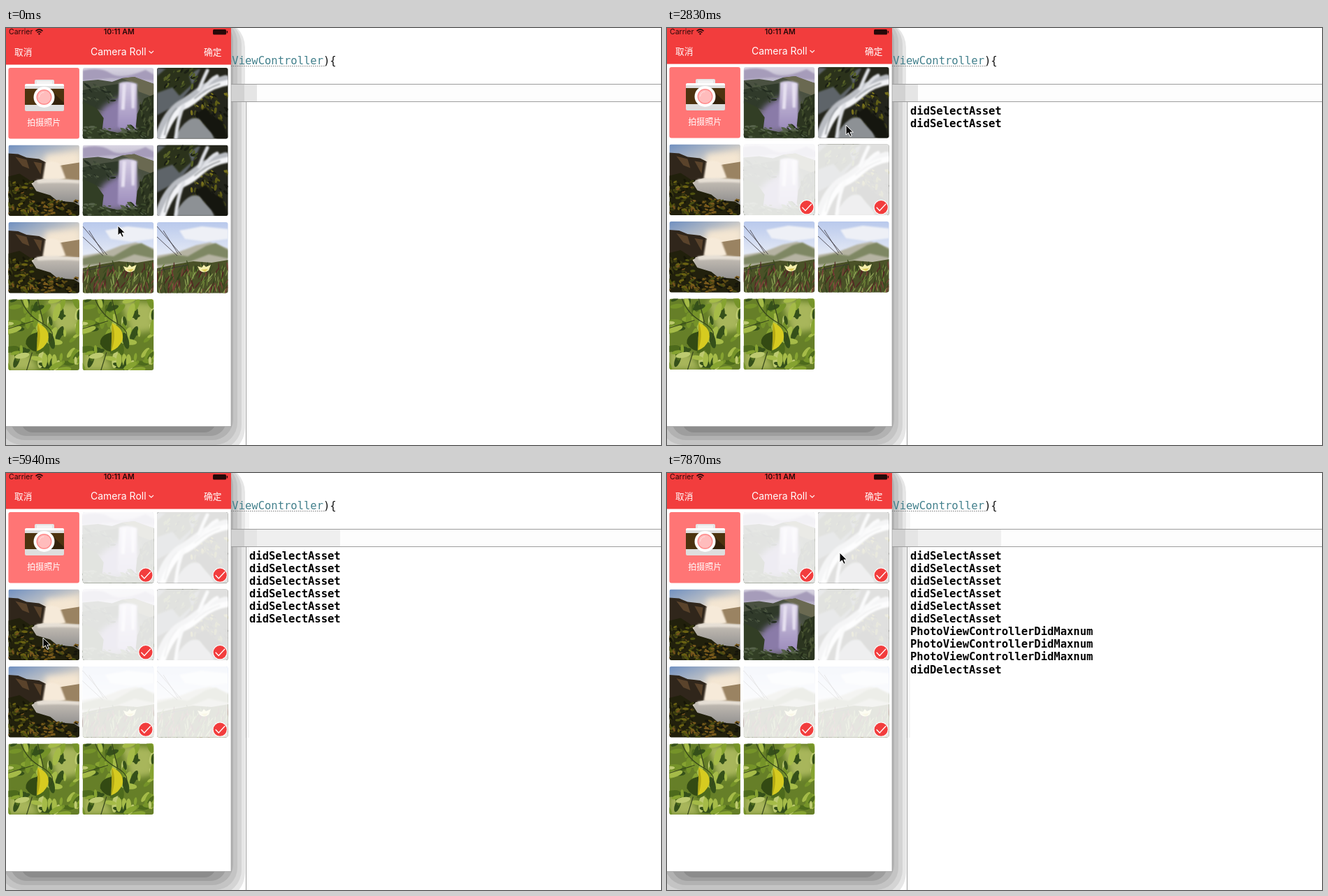
An HTML page that plays this animation: 937 px wide and 597 px high, repeating every 8000 ms.

```html
<!DOCTYPE html>
<html lang="zh">
<head>
<meta charset="utf-8">
<title>Photo picker</title>
<style>
html, body { margin: 0; width: 100%; height: 100%; overflow: hidden; background: #fff; }
svg { display: block; width: 937px; height: 597px; }
.ui { font-family: Inter, "Noto Sans CJK SC", "Noto Sans CJK", sans-serif; }
.mono { font: 15.5px "DejaVu Sans Mono", monospace; white-space: pre; }
#log { font-weight: bold; }
.soft { filter: blur(1.2px); }
.haze { filter: blur(4px); }
</style>
</head>
<body>
<svg viewBox="0 0 937 597">
<defs>
  <clipPath id="round"><rect width="101.5" height="101.5" rx="3"/></clipPath>
  <linearGradient id="dusk" x2="0" y2="1"><stop stop-color="#d9d5e2"/><stop offset="1" stop-color="#aaa3bd"/></linearGradient>
  <linearGradient id="fall" x2="0" y2="1"><stop stop-color="#d4cce3"/><stop offset="1" stop-color="#9b8bbb"/></linearGradient>
  <linearGradient id="morning" x2=".7" y2="1"><stop stop-color="#6f8fc0"/><stop offset=".55" stop-color="#d5d0c8"/><stop offset="1" stop-color="#f0dfc0"/></linearGradient>
  <linearGradient id="lake" x2="0" y2="1"><stop stop-color="#d0c8bd"/><stop offset="1" stop-color="#74767a"/></linearGradient>
  <linearGradient id="pale" x2="0" y2="1"><stop stop-color="#b9c9ec"/><stop offset="1" stop-color="#f1f3f8"/></linearGradient>

  <g id="gorge">
    <path fill="url(#dusk)" d="M0 0h102v30H0z"/>
    <path class="soft" fill="#a69cba" d="M0 4Q25-2 40 8T90 3L102 10V18L40 15L0 18z"/>
    <path fill="#4a5141" d="M0 19L22 17L42 20L56 15L74 13L88 19L102 23V102H0z"/>
    <path fill="#6a6951" d="M56 15L74 13L102 23V42L80 34L78 23z"/>
    <path fill="#303a2a" d="M0 32L30 26L52 23V60L30 62L0 52z"/>
    <path class="haze" fill="#8a7ba8" d="M30 56L52 42H76L82 90L30 94L18 76z"/>
    <path class="soft" fill="url(#fall)" d="M52 22Q64 17 78 23L77 88Q62 94 50 84z"/>
    <path class="soft" fill="#e6e0f0" d="M57 23h5L60 60h-5zM69 23h6L74 58h-4z"/>
    <path fill="#2c3520" d="M102 38L88 44L78 66L76 84L88 102H102z"/>
    <path fill="#323e25" d="M0 48L20 58L30 72L28 88L50 93L78 88L96 102H0z"/>
    <g id="gorgeMoss"></g>
  </g>

  <g id="stream">
    <path fill="#24251c" d="M0 0h102v102H0z"/>
    <path class="soft" fill="#5e6469" d="M0 0L30 4L62 2L48 30L30 52L0 68z"/>
    <path class="soft" fill="#2b321b" d="M14 0H60L46 12L50 24L32 40L22 28L0 36V12z"/>
    <g id="streamMoss"></g>
    <path class="soft" fill="#8d9195" d="M24 102Q44 64 62 74L78 92L82 102z"/>
    <g class="soft" fill="none" stroke-linecap="round">
      <path stroke="#b9bcc2" stroke-width="13" d="M98 17Q74 24 60 35T34 53Q14 66 4 98"/>
      <path stroke="#f3f4f7" stroke-width="8" d="M102 21Q78 25 64 38T38 56Q20 68 8 102"/>
      <path stroke="#dfe1e6" stroke-width="5" d="M38 54Q30 72 27 100M72 4Q66 16 60 31M86 12Q76 16 66 32"/>
      <path stroke="#85898d" stroke-width="1.5" d="M28 58Q16 70 11 96M90 23Q70 30 54 44"/>
    </g>
    <path class="soft" fill="#15160f" d="M70 56L80 70L94 76L102 102H86L68 82L56 66z"/>
  </g>

  <g id="cove">
    <path fill="url(#morning)" d="M0 0h102v60H0z"/>
    <path class="haze" fill="#f4e6d2" d="M54 14L102 10V48H48z"/>
    <path fill="url(#lake)" d="M36 48L102 44V102H30z"/>
    <path fill="#9a8362" d="M70 30L102 25V50L72 50z"/>
    <path fill="#30261b" d="M0 12L14 13L26 18L44 20L54 25L52 48L34 52L0 60z"/>
    <path fill="#5a432b" d="M10 17L26 21L30 34L20 30zM36 24L48 26L46 42z"/>
    <path class="soft" fill="#f6ead9" d="M53 25Q64 21 74 27L82 48Q66 54 49 49z"/>
    <path class="soft" fill="#e6dfd5" d="M40 50Q70 46 102 51V55Q70 53 42 55z"/>
    <path fill="#21200c" d="M0 45L16 41L30 50L40 66L60 72L70 80L94 82L102 87V102H0z"/>
    <g id="coveMoss"></g>
  </g>

  <g id="meadow">
    <path fill="url(#pale)" d="M0 0h102v60H0z"/>
    <path class="soft" fill="#eef0f6" d="M32 12L64 6L102 10V24L70 28L40 24z"/>
    <path class="soft" fill="#b5b3a2" d="M0 48L30 43L56 33L76 29L102 38V72H0z"/>
    <path class="soft" fill="#7e8763" d="M0 52L24 46L44 49L70 34L84 30L102 40V52L74 46L46 57L0 62z"/>
    <path fill="#4a5127" d="M0 66L28 60L52 56L78 58L102 54V102H0z"/>
    <g id="meadowGrass"></g>
    <path fill="none" stroke="#39343a" stroke-width=".8" d="M0 6L35 47M0 21L29 48M9 12L30 45M0 70L44 61"/>
    <path fill="#f4efac" d="M58 63L64 65L67 61L70 64L77 61L74 69Q67 74 61 69z"/>
    <path fill="#dccc55" d="M63 68L73 67L69 71z"/>
  </g>

  <g id="leaves">
    <path fill="#667f28" d="M0 0h102v102H0z"/>
    <path class="haze" fill="#a8b65b" d="M54 2L102 6V44L70 50zM0 72L32 80L44 102H0z"/>
    <g id="leafMass"></g>
    <path fill="none" stroke="#35451b" stroke-width="1.2" d="M18 0Q26 22 48 34T60 60M42 0L50 34M0 42L36 31M34 76L26 102"/>
    <path fill="#334a13" d="M42 47Q24 51 25 64Q31 74 40 75z"/>
    <path fill="#d6cb20" d="M42 34Q60 42 57 58Q52 70 41 74z"/>
    <path fill="#b4a914" d="M42 34Q49 52 41 74z"/>
  </g>

  <g id="badge">
    <circle r="10.6" fill="#fff"/><circle r="9.6" fill="#f23d3d"/>
    <path fill="none" stroke="#fff" stroke-width="1.3" d="M-6.5 0L-2 4.8L7-5"/>
  </g>
</defs>

<rect width="937" height="597" fill="#fff"/>
<path fill="#fdfdfd" d="M322 81h615v24H322z"/>
<g id="shadow"></g>
<path id="ghost" fill="#f6f6f6"/>
<path id="strip" fill="#efefef" d="M359 81h119v24H359z"/>
<path fill="#e5e5e5" d="M341 81h18v24h-18z"/>
<path fill="#d2d2d2" d="M322 81h19v24h-19z"/>
<path fill="none" stroke="#9c9c9c" d="M322 80.5h615M322 105.5h615M343.5 106V597"/>
<text class="mono" x="276.7" y="51.5" fill="#43808c">PhotoViewController<tspan fill="#111">){</tspan></text>
<path stroke="#777" stroke-dasharray="1.5 1.5" d="M322 54.5h134"/>
<g id="log" class="mono"></g>

<rect x="-5" y="-5" width="327" height="575.5" fill="#fff"/>
<path fill="none" stroke="#8f8f8f" d="M0 570.5H322V52" stroke-opacity=".6"/>
<rect id="bar" width="322" height="51.5" fill="#f23d3d"/>
<g class="ui" fill="#260909">
  <text x="4" y="9.3" font-size="10.5">Carrier</text>
  <text x="161.7" y="9.3" font-size="10.6" font-weight="600" text-anchor="middle">10:11 AM</text>
  <g fill="none" stroke="#260909" stroke-width="1.6"><path d="M42.5 4.3Q47.5 0 52.5 4.3M44.5 6.5Q47.5 4 50.5 6.5"/></g>
  <circle cx="47.5" cy="8.4" r="1.2"/>
  <rect x="296" y="2" width="19" height="7.5" rx="1.5"/><rect x="315.7" y="4" width="1.4" height="3.4"/>
</g>
<g id="content">
  <g class="ui" fill="#fff">
    <text x="12" y="37.6" font-size="12.7">取消</text>
    <text x="121" y="38" font-size="14">Camera Roll</text>
    <text x="283" y="37.6" font-size="12.7">确定</text>
    <path fill="none" stroke="#fff" stroke-width="1.1" d="M204.5 31.8L207.8 35L211 31.8"/>
    <rect x="3.4" y="56" width="101.5" height="101.5" rx="3" fill="#ff7575"/>
    <path fill="#e5e5e5" d="M41 79V75Q41 73 43 73H67Q69 73 69 75V79z"/>
    <path fill="#f3f3f3" d="M44 75h22v4H44z"/>
    <path fill="#fff" d="M29 79H81Q83 79 83 81V86H27V81Q27 79 29 79z"/>
    <path fill="#dedede" d="M27 82h56v34q0 2-2 2H29q-2 0-2-2z"/>
    <path fill="#4c3310" d="M27 86h56v23H27z"/>
    <path fill="#33220c" d="M62 86L83 106V109H44z"/>
    <circle cx="54.5" cy="98" r="15"/>
    <circle cx="54.5" cy="98" r="11" fill="#ff8c8c"/><circle cx="54.5" cy="98" r="9.6" fill="#ffbcbc"/>
    <path fill="none" stroke="#ffdede" d="M47.5 98a7 7 0 0 1 7-7"/>
    <text x="54.3" y="139" font-size="12" text-anchor="middle">拍摄照片</text>
  </g>
  <g id="tiles"></g>
</g>
<path id="cursor" d="M0 0V14L3.4 11L6 16.4L8.4 15.3L6 10.2H10.4z" fill="#0a0a0a" stroke="#fff" stroke-width="1" stroke-linejoin="round"/>
</svg>

<script>
const LOOP = 8000, STEP = 148;
const $ = id => document.getElementById(id);
const add = (id, markup) => {
  $(id).insertAdjacentHTML('beforeend', markup);
  return $(id).lastElementChild;
};
const show = (el, on) => el.setAttribute('visibility', on ? 'visible' : 'hidden');

function scatter(id, count, [x, y, w, h], [long, thin], [angle, spread], colors) {
  let seed = count * 7919;
  const rnd = () => (seed = seed * 16807 % 2147483647) / 2147483647;
  let out = '';
  for (let i = 0; i < count; i++) {
    const px = x + rnd() * w, py = y + rnd() * h, k = .5 + rnd() * .7;
    const turn = angle + (rnd() - .5) * spread, color = colors[Math.floor(rnd() * colors.length)];
    out += `<ellipse rx="${(long * k).toFixed(1)}" ry="${(thin * k).toFixed(1)}" fill="${color}" ` +
      `transform="translate(${px.toFixed(1)} ${py.toFixed(1)}) rotate(${turn.toFixed()})"/>`;
  }
  add(id, `<g>${out}</g>`);
}

scatter('gorgeMoss', 70, [0, 84, 90, 18], [4, 1.3], [20, 70], ['#4a5a38', '#56624a', '#26301d', '#3c4a2c']);
scatter('gorgeMoss', 36, [82, 42, 20, 54], [4, 1.4], [110, 60], ['#3e4a2a', '#222a18', '#4a5434']);
scatter('gorgeMoss', 34, [0, 24, 46, 26], [4, 1.2], [30, 70], ['#4c5740', '#232c20', '#3b4635']);
scatter('streamMoss', 75, [48, 34, 52, 52], [4, 1.8], [60, 80], ['#5f5d17', '#77701c', '#2e3014', '#16170f', '#47491d']);
scatter('streamMoss', 30, [10, 2, 46, 26], [4, 1.6], [130, 70], ['#3f4a20', '#1b2014', '#566026']);
scatter('coveMoss', 85, [0, 52, 34, 48], [3.5, 1.6], [30, 120], ['#4f5210', '#6a6113', '#161607', '#3a3a10', '#71501c']);
scatter('coveMoss', 75, [32, 78, 66, 23], [3.5, 1.5], [10, 80], ['#5b4a14', '#7a5a1c', '#15140a', '#464a12']);
scatter('meadowGrass', 160, [0, 62, 102, 40], [7, .9], [100, 60], ['#6d8338', '#8a9d52', '#30401b', '#522a24', '#3d4b20', '#7a4038']);
scatter('leafMass', 85, [0, 0, 102, 102], [11, 4], [130, 120], ['#86a331', '#4d6a1c', '#a5bb48', '#35501a', '#759329', '#bdca70']);

// Right edge, bottom edge, corner radius and grey of each shadow band
[[342, 612, 40, 230], [337, 604, 36, 212], [331, 597, 32, 196], [325, 590, 30, 178], [315, 584, 22, 158], [300, 579, 16, 140]]
  .forEach(([right, bottom, r, grey]) => add('shadow',
    `<rect x="${322 - right}" y="-12" width="${right * 2 - 322}" height="${bottom + 12}" rx="${r}" fill="rgb(${grey},${grey},${grey})"/>`));

const photos = ['gorge', 'stream', 'cove', 'gorge', 'stream', 'cove', 'meadow', 'meadow', 'leaves', 'leaves'];
const tiles = photos.map((photo, i) => {
  const slot = i + 1, x = 3.4 + slot % 3 * 106.3, y = 56 + Math.floor(slot / 3) * 110.5;
  const el = add('tiles', `<g transform="translate(${x} ${y})"><g clip-path="url(#round)"><use href="#${photo}"/>
    <rect width="102" height="102" fill="#fff"/></g><use href="#badge" x="90.2" y="90.2"/></g>`);
  return { veil: el.querySelector('rect'), badge: el.lastElementChild };
});

// Slot, time selected, time released
const picks = [[5, 1790], [6, 2385], [3, 3570], [2, 4460], [8, 5050], [9, 5500]]
  .map(([place, on]) => ({ tile: tiles[place - 2], on, off: place === 5 ? 7430 : LOOP }));
const refusals = [6380, 6680, 7130];
const refused = tiles[2];

const lines = [
  ...picks.map(p => [p.on, 'didSelectAsset']),
  ...refusals.map(t => [t, 'PhotoViewControllerDidMaxnum']),
  [7430, 'didDelectAsset']
].map(([time, text], i) => ({ time, el: add('log', `<text x="348" y="${124 + i * 18.06}">${text}</text>`) }));

// Start, number of steps, end point
const moves = [
  [150, 2, 163, 284], [900, 5, 164, 221], [1790, 1, 195, 225], [1940, 3, 262, 228],
  [2530, 3, 256, 139], [4160, 2, 178, 113], [4600, 4, 165, 320], [5200, 1, 215, 322],
  [5350, 1, 268, 322], [5640, 3, 53, 236], [6230, 2, 55, 227], [7280, 2, 165, 222], [7570, 3, 247, 114]
];

function cursorAt(t) {
  let x = 160, y = 283;
  for (const [start, steps, toX, toY] of moves) {
    if (t < start) break;
    const k = Math.min(1, (Math.floor((t - start) / STEP) + 1) / steps);
    x += (toX - x) * k;
    y += (toY - y) * k;
  }
  return `translate(${x} ${y})`;
}

function draw() {
  const t = performance.now() % LOOP;
  const shift = t < 150 ? 1 : t < 300 ? .5 : 0;
  $('content').setAttribute('transform', `translate(0 ${shift})`);
  $('bar').setAttribute('height', 51.5 + shift);
  $('cursor').setAttribute('transform', cursorAt(t));
  for (const { veil, badge } of tiles) {
    veil.setAttribute('opacity', 0);
    show(badge, false);
  }
  for (const { tile, on, off } of picks) {
    if (t < on || t >= off) continue;
    tile.veil.setAttribute('opacity', .86);
    show(tile.badge, true);
  }
  if (refusals.some(r => t >= r && t < r + 155)) refused.veil.setAttribute('opacity', .12);
  for (const { time, el } of lines) show(el, t >= time);
  show($('strip'), t >= 3570);
  show($('ghost'), t >= 3570);
  $('ghost').setAttribute('d', `M342 56h6V${t < 5050 ? 161 : 379}h-6z`);
  requestAnimationFrame(draw);
}
draw();
</script>
</body>
</html>
```
